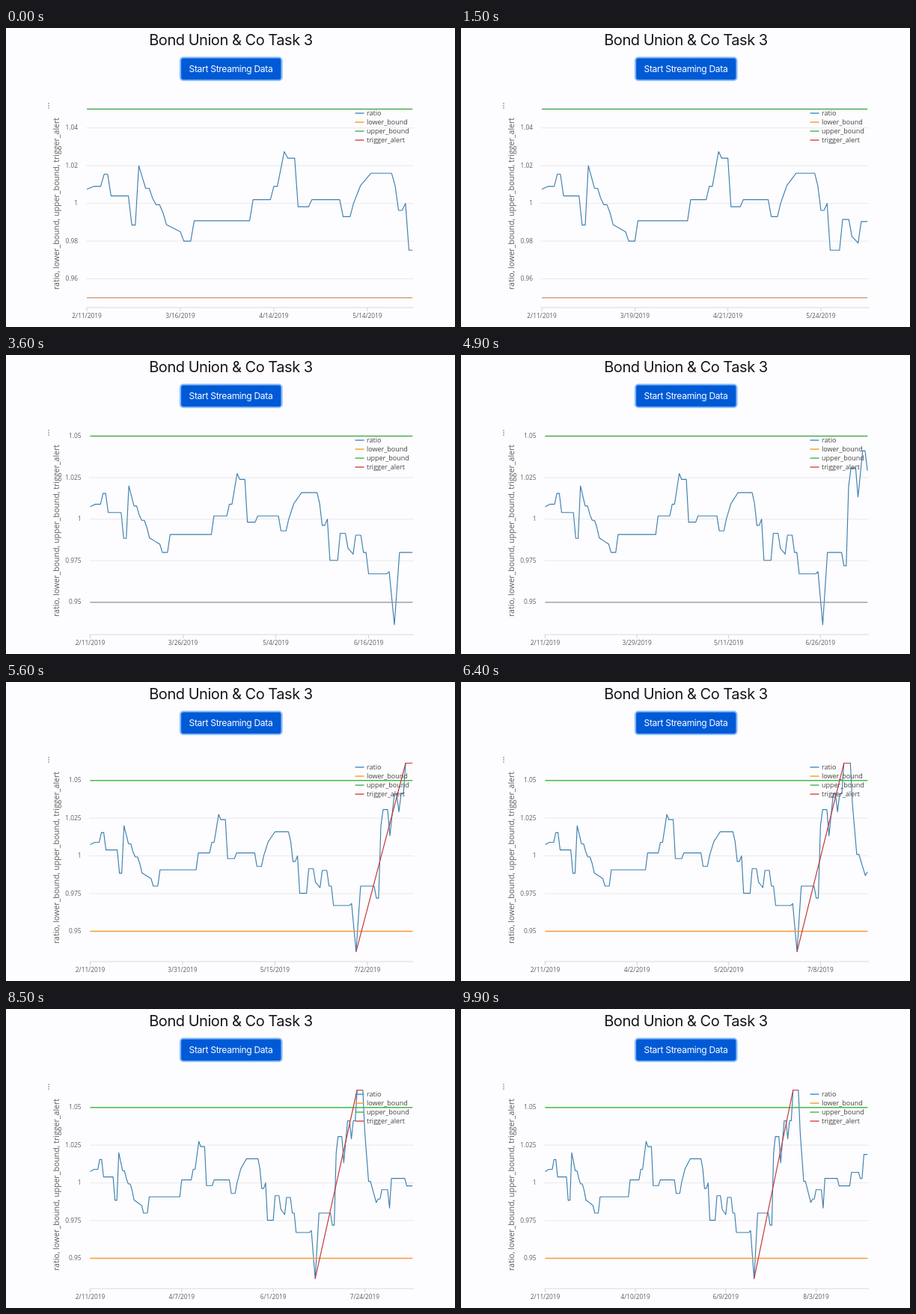
Write an HTML page that moves like this. It is 600 by 400 pixels and loops after 10000 ms.

```html
<!DOCTYPE html>
<html lang="en">
<head>
<meta charset="utf-8">
<title>Streaming ratio chart</title>
<style>
html, body { margin: 0; width: 100%; height: 100%; overflow: hidden; background: #fdfcfe; }
svg { display: block; font-family: "Open Sans", sans-serif; fill: #5c5c5c; }
.ui { font-family: Inter, sans-serif; text-anchor: middle; }
#plot { font-size: 8.3px; }
#plot path { fill: none; stroke-linejoin: round; }
</style>
</head>
<body>
<svg width="600" height="400" viewBox="0 0 600 400">
  <text class="ui" x="300.5" y="23" font-size="20" letter-spacing="-.46" fill="#16161a">Bond Union &amp; Co Task 3</text>
  <rect x="233" y="39.5" width="135.5" height="30.5" rx="4" fill="#005ad6" stroke="#86bbfb" stroke-width="2.2"/>
  <text class="ui" x="300.5" y="59" font-size="12" letter-spacing="-.28" fill="#fff">Start Streaming Data</text>
  <g fill="#666"><circle cx="57" cy="101" r=".8"/><circle cx="57" cy="104" r=".8"/><circle cx="57" cy="107" r=".8"/></g>
  <g id="plot"></g>
  <text transform="translate(70.7 235) rotate(-90)" font-size="10.6" text-anchor="middle">ratio, lower_bound, upper_bound, trigger_alert</text>
  <g id="legend" font-size="9" fill="#444"></g>
</svg>
<script>
const TOP = 108.5, BOTTOM = 360.8, RIGHT = 543.1, LOWER = 0.95, UPPER = 1.05;
const plot = document.getElementById('plot');

// Key points [index, (ratio - 1) * 1000]: each level holds until the next jump;
// a negative index is reached by a straight ramp instead.
const keys = [
  [0, 7.5], [-2, 9], [5, 15.5], [7, 4], [13, -11.5], [15, 20], [-17, 8], [19, 2.7], [20, -.7],
  [22, -5], [23, -11.3], [-27, -15], [28, -20], [31, -9.2], [48, 2], [54, 9], [55, 9], [-57, 27.5],
  [58, 24], [61, -1.8], [65, 2], [74, -7], [77, 0], [-79, 9.4], [-82, 16], [89, 9.4], [90, -3.7],
  [92, 0], [93, -24.8], [97, -8.5], [100, -17.5], [-102, -21], [103, -9.6], [106, -20], [108, -32.9],
  [116, -31.6], [-118, -63.5], [-120, -20], [127, -28], [129, 19.7], [130, 30.7], [133, 13.4],
  [-135, 41.2], [137, 29.2], [138, 41.2], [140, 61.5], [144, 34], [-146, 1], [147, 1], [-150, -13],
  [151, -10.7], [153, -4.5], [157, -16.6], [158, 3], [166, -2], [173, 7], [178, 3], [180, 18.8]
];

function lerp(points, x) {
  const k = Math.max(1, points.findIndex(p => p[0] >= x));
  const [x0, y0] = points[k - 1], [x1, y1] = points[k];
  return y0 + (y1 - y0) * (x - x0) / (x1 - x0);
}
function ratioAt(i) {
  const k = keys.findLastIndex(([at]) => Math.abs(at) <= i);
  const [at, level] = keys[k], [next, goal] = keys[k + 1] || keys[k];
  const ramp = next < 0 ? (i - Math.abs(at)) / (-next - Math.abs(at)) : 0;
  return 1 + (level + (goal - level) * ramp) / 1000;
}
const ratios = Array.from({ length: 183 }, (_, i) => ratioAt(i));

// Newest point by step, and day by point; weekends and holidays leave gaps.
const newest = step => Math.round(lerp([[0, 94], [15, 105], [64, 151], [99, 181.8]], step));
const dayOf = i => Math.round(lerp([[0, 0], [27, 33.3], [51, 58], [60, 69], [90, 102.4], [108, 125.2], [183, 204.4]], i));
function dateLabel(i) {
  const d = new Date(2019, 1, 11 + dayOf(i));
  return `${d.getMonth() + 1}/${d.getDate()}/${d.getFullYear()}`;
}

const path = (d, color, width) => `<path d="${d}" stroke="${color}" stroke-width="${width}"/>`;
const label = (x, y, anchor, text) => `<text x="${x}" y="${y}" text-anchor="${anchor}">${text}</text>`;

function draw(step) {
  const last = newest(step);
  const points = ratios.slice(0, last + 1).map((v, i) => [i, v]);
  const alerts = points.filter(([, v]) => v < LOWER || v > UPPER);
  const values = points.map(p => p[1]);
  const min = Math.min(LOWER, ...values), max = Math.max(UPPER, ...values);
  const wide = min < LOWER, high = max > UPPER;
  const left = wide ? 112.5 : 108, tick = wide ? 0.025 : 0.02;
  const X = i => left + (RIGHT - left) * i / last;
  const Y = v => TOP + (max - v) / (max - min) * (BOTTOM - TOP);
  const line = pts => 'M' + pts.map(([i, v]) => X(i).toFixed(2) + ' ' + Y(v).toFixed(2)).join('L');
  const level = v => line([[0, v], [last, v]]);
  let out = '';

  for (let k = Math.ceil(min / tick - 1e-6); k * tick < max + 1e-6; k++) {
    const y = Y(k * tick);
    out += path(`M${left - 1} ${y}H545`, '#e9e8eb', 1);
    out += label(left - 12, y + 2.6, 'end', +(k * tick).toFixed(3));
  }
  out += path(`M${left - 1} 374H545`, '#d6dae3', 1);
  const every = Math.ceil(last / 3.57);
  for (let i = 0; i <= last; i += every) {
    out += path(`M${X(i)} 374v5`, '#ccd3e0', 1) + label(X(i), 387.7, 'middle', dateLabel(i));
  }

  out += path(line(points), '#3d80b0', 1.15);
  out += path(level(LOWER), high ? '#f99a35' : wide ? '#9b9096' : '#cb9068', high ? 1.5 : 1.2);
  out += path(level(UPPER), high ? '#45bd48' : '#4bab50', 1.4);
  if (alerts.length > 1) out += path(line(alerts), '#c23b3d', 1.2);
  plot.innerHTML = out;
}

document.getElementById('legend').innerHTML = [
  ['ratio', '#4f92c8'], ['lower_bound', '#fb9f32'], ['upper_bound', '#55b65a'], ['trigger_alert', '#d8504c']
].map(([name, color], k) =>
  path(`M466.5 ${114 + 12 * k}h12`, color, 1.5) + label(482, 117 + 12 * k, 'start', name)).join('');

let current = -1;
function frame() {
  const step = Math.floor(performance.now() % 10000 / 100);
  if (step !== current) draw(current = step);
  requestAnimationFrame(frame);
}
frame();
</script>
</body>
</html>
```
